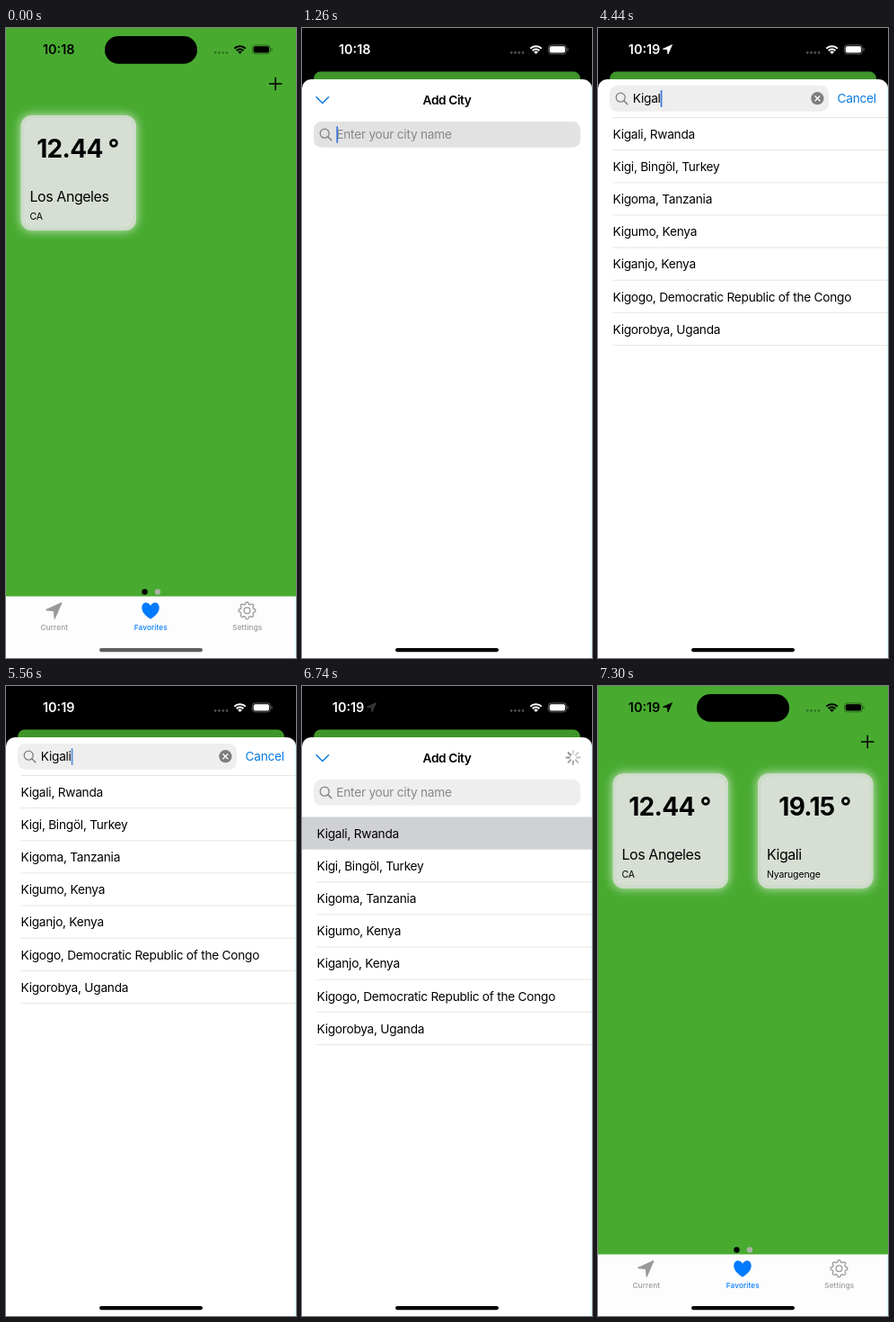
Write an HTML page with a canvas that moves like this. It is 323 by 700 pixels and loops after 8 s.

```html
<!DOCTYPE html>
<html lang="en">
<head>
<meta charset="utf-8">
<title>Add City</title>
<style>
html, body { margin: 0; width: 100%; height: 100%; overflow: hidden; background: #000; }
canvas { display: block; width: 323px; height: 700px; }
</style>
</head>
<body>
<canvas id="stage"></canvas>
<script>
const W = 323, H = 700, LOOP = 8000;
const canvas = document.getElementById('stage');
const dpr = window.devicePixelRatio || 1;
canvas.width = W * dpr;
canvas.height = H * dpr;
const ctx = canvas.getContext('2d');

const GREEN = '#48ab30', BLUE = '#0a7be0', GRAY = '#99999b';
const CITIES = ['Kigali, Rwanda', 'Kigi, Bingöl, Turkey', 'Kigoma, Tanzania', 'Kigumo, Kenya',
  'Kiganjo, Kenya', 'Kigogo, Democratic Republic of the Congo', 'Kigorobya, Uganda'];
const QUERY = 'Kigali', KEY_TIMES = [2610, 2860, 3440, 3930, 4440, 4800];
const SHEET_TOP = 57, ROW = 36.14;
const OPEN = 60, TAP = 1260, FOCUS = 1410, PICK = 6280, BLUR = 6360, CLOSE = 6785;

const ramp = (t, a, b) => Math.min(1, Math.max(0, (t - a) / (b - a)));
const easeOut = x => 1 - (1 - x) ** 3;
const easeInOut = x => x * x * (3 - 2 * x);

// Critically damped spring, 0 to 1
function spring(ms) {
  const x = Math.max(0, ms) * 0.0196;
  return 1 - (1 + x) * Math.exp(-x);
}

function text(str, x, y, size, { weight = 400, color = '#000', spacing = 0, align = 'left' } = {}) {
  ctx.font = `${weight} ${size}px Inter, sans-serif`;
  ctx.letterSpacing = spacing + 'px';
  ctx.textAlign = align;
  ctx.fillStyle = color;
  ctx.fillText(str, x, y);
  return ctx.measureText(str).width;
}
const body = (str, x, y, color) => text(str, x, y, 13.7, { color, spacing: -0.26 });

function box(x, y, w, h, r, color) {
  ctx.fillStyle = color;
  ctx.beginPath();
  ctx.roundRect(x, y, w, h, r);
  ctx.fill();
}

function dot(x, y, r, color) {
  ctx.fillStyle = color;
  ctx.beginPath();
  ctx.arc(x, y, r, 0, 7);
  ctx.fill();
}

function line(points, color, width, cap = 'butt') {
  ctx.strokeStyle = color;
  ctx.lineWidth = width;
  ctx.lineCap = cap;
  ctx.lineJoin = 'round';
  ctx.beginPath();
  points.forEach(([x, y]) => ctx.lineTo(x, y));
  ctx.stroke();
}

function layer(alpha, draw) {
  if (alpha <= 0) return;
  ctx.save();
  ctx.globalAlpha *= alpha;
  draw();
  ctx.restore();
}

function arrow(x, y, r, color) {
  ctx.fillStyle = ctx.strokeStyle = color;
  ctx.lineWidth = r * 0.15;
  ctx.lineJoin = 'round';
  ctx.beginPath();
  [[0.9, -0.9], [-0.9, -0.08], [0.02, 0.02], [0.1, 0.92]].forEach(([u, v]) => ctx.lineTo(x + u * r, y + v * r));
  ctx.closePath();
  ctx.fill();
  ctx.stroke();
}

function heart(x, y) {
  ctx.fillStyle = '#007aff';
  ctx.beginPath();
  ctx.moveTo(x, y + 9.5);
  for (const s of [-1, 1]) {
    ctx.moveTo(x, y + 9.5);
    ctx.bezierCurveTo(x + 5 * s, y + 6.5, x + 9.7 * s, y + 2.5, x + 9.7 * s, y - 3.2);
    ctx.bezierCurveTo(x + 9.7 * s, y - 10, x + 2.2 * s, y - 10.5, x, y - 5.3);
  }
  ctx.fill();
}

function gear(x, y) {
  ctx.strokeStyle = GRAY;
  ctx.lineWidth = 1.3;
  ctx.beginPath();
  for (let i = 0; i <= 160; i++) {
    const a = i / 160 * 2 * Math.PI;
    const r = 8.3 + Math.max(-1, Math.min(1, 2 * Math.cos(8 * a)));
    ctx.lineTo(x + r * Math.cos(a), y + r * Math.sin(a));
  }
  ctx.moveTo(x + 3.4, y);
  ctx.arc(x, y, 3.4, 0, 7);
  ctx.stroke();
}

function card(x, temp, city, region) {
  ctx.save();
  ctx.shadowColor = 'rgba(255,255,255,.75)';
  ctx.shadowBlur = 11 * dpr;
  box(x, 97, 128.5, 128, 12, '#cbdbc7');
  ctx.shadowColor = '#d7dfd5';
  ctx.shadowBlur = 4 * dpr;
  box(x + 4, 101, 120.5, 120, 9, '#d7dfd5');
  ctx.restore();
  text(temp, x + 63.5, 143.5, 28, { weight: 700, spacing: -0.7, align: 'center' });
  text(city, x + 10, 193, 16, { spacing: -0.45 });
  text(region, x + 10, 212.7, 10.5, { spacing: -0.15 });
}

function edgeTint(y) {
  ctx.fillStyle = '#e2fdff';
  ctx.fillRect(W - 1.5, y, 1.5, H);
}

function favorites(t) {
  ctx.fillStyle = GREEN;
  ctx.fillRect(0, 0, W, H);
  line([[293, 62], [307.4, 62]], '#000', 1.6);
  line([[300.2, 54.8], [300.2, 69.2]], '#000', 1.6);
  card(16.5, '12.44 °', 'Los Angeles', 'CA');
  if (t > CLOSE) card(178, '19.15 °', 'Kigali', 'Nyarugenge');
  dot(154.5, 626.5, 3.2, '#000');
  dot(169, 626.5, 3.2, '#a9b3a6');
  ctx.fillStyle = '#fdfdfd';
  ctx.fillRect(0, 631.5, W, 70);
  edgeTint(632);
  arrow(53.3, 647.3, 9.4, GRAY);
  heart(161, 647.3);
  gear(268.5, 647.3);
  const label = (str, x, color) => text(str, x, 668.7, 8.2, { weight: 500, color, spacing: 0.13, align: 'center' });
  label('Current', 53.8, GRAY);
  label('Favorites', 161.3, '#007aff');
  label('Settings', 268.8, GRAY);
}

function spinner(t, x, y) {
  const head = Math.floor(t / 125) % 8;
  for (let i = 0; i < 8; i++) {
    const a = i * Math.PI / 4, age = (head - i + 8) % 8;
    const at = r => [x + r * Math.cos(a), y + r * Math.sin(a)];
    line([at(4), at(7.6)], `rgba(60,60,67,${0.6 - 0.055 * age})`, 2, 'round');
  }
}

function searchField(t, y, active, query) {
  const right = 310 - 53 * active;
  box(13, y, right - 13, 28.8, 8.5, t >= TAP && t < FOCUS + 30 ? '#e2e2e3' : '#eeeeef');
  ctx.strokeStyle = '#7f7f83';
  ctx.lineWidth = 1.3;
  ctx.beginPath();
  ctx.arc(25.2, y + 13.2, 5, 0, 7);
  ctx.stroke();
  line([[28.8, y + 16.8], [32.8, y + 20.8]], '#7f7f83', 1.5, 'round');

  let end = 38.3;
  if (query) {
    end = 38.8 + body(query, 38.8, y + 19.4);
    const cx = right - 12.6, cy = y + 14.2;
    dot(cx, cy, 7.1, '#7d7d80');
    for (const s of [-1, 1]) line([[cx - 2.5, cy - 2.5 * s], [cx + 2.5, cy + 2.5 * s]], '#fff', 1.3, 'round');
  } else {
    body('Enter your city name', 38.3, y + 19.4, '#88888b');
  }
  if (t >= TAP && t < BLUR) {
    const blink = 1 - ramp(t, 1960, 2050) + ramp(t, 2310, 2400) - ramp(t, 5530, 5690) + ramp(t, 5940, 6040);
    layer(blink, () => box(end, y + 5, 1.8, 19, 0.9, '#3f78d8'));
  }
}

function sheet(t, offset) {
  const top = SHEET_TOP + offset;
  const bottomRadius = Math.min(50, offset * 50 / 28);
  const active = easeOut(ramp(t, FOCUS, 1690)) - easeOut(ramp(t, BLUR, 6660));
  const query = t < BLUR ? QUERY.slice(0, KEY_TIMES.filter(k => t >= k).length) : '';

  ctx.save();
  ctx.beginPath();
  ctx.roundRect(0, top, W, H - SHEET_TOP, [10, 10, bottomRadius, bottomRadius]);
  ctx.clip();
  ctx.fillStyle = '#fff';
  ctx.fillRect(0, top, W, H);
  edgeTint(top);

  layer(1 - active, () => {
    const y = top - 40 * active;
    line([[16, y + 19.7], [22.8, y + 26.5], [29.6, y + 19.7]], BLUE, 1.5, 'round');
    text('Add City', W / 2, y + 27.6, 13.7, { weight: 600, spacing: -0.4, align: 'center' });
    if (t >= BLUR) spinner(t, 302, y + 22.5);
  });
  layer(active, () => body('Cancel', 266.5 + 56 * (1 - active), top + 25.8, BLUE));
  searchField(t, top + 47 - 40 * active, active, query);

  const count = t < 3930 ? 0 : t < 4440 ? 2 : CITIES.length;
  const listTop = top + 88.5 - 46 * active;
  if (count && t >= PICK) {
    ctx.fillStyle = '#d0d1d5';
    ctx.fillRect(0, listTop, W, ROW);
  }
  if (count && active > 0.5) line([[16.5, listTop], [W, listTop]], '#e2e2e4', 0.9);
  CITIES.slice(0, count).forEach((city, i) => {
    const y = listTop + i * ROW;
    body(city, 16.5, y + 23.3);
    line([[16.5, y + ROW], [W, y + ROW]], '#e2e2e4', 0.9);
  });
  ctx.restore();
}

function statusBar(t, p) {
  const c = Math.round(255 * p ** 4), color = `rgb(${c},${c},${c})`;
  box(110, 9, 103, 30.7, 15.3, '#000');

  const slide = easeInOut(ramp(t, 2690, 2900)) - easeInOut(ramp(t, 4780, 5040)) + easeInOut(ramp(t, 6470, 6690));
  const marker = ramp(t, 2900, 3180) - ramp(t, 4500, 4780) + ramp(t, 6690, 6970);
  text(t < 3440 ? '10:18' : '10:19', 41 - 7.2 * slide, 29, 14.4, { weight: 600, color });
  layer(marker, () => arrow(77.4, 23.8, 5.6, color));

  layer(0.32, () => {
    for (let i = 0; i < 4; i++) dot(233.2 + 4.3 * i, 27.4, 1.35, color);
  });

  const arc = (r, width) => {
    ctx.strokeStyle = color;
    ctx.lineWidth = width;
    ctx.lineCap = 'butt';
    ctx.beginPath();
    ctx.arc(260.6, 29, r, -2.36, -0.78);
    ctx.stroke();
  };
  arc(8.8, 2);
  arc(5.4, 2);
  arc(1.7, 3.4);

  layer(0.4, () => {
    ctx.strokeStyle = color;
    ctx.lineWidth = 0.9;
    ctx.beginPath();
    ctx.roundRect(274.4, 18.9, 20, 10, 3.2);
    ctx.stroke();
    box(295.4, 22.2, 1.2, 3.4, 0.6, color);
  });
  box(275.7, 20.2, 17.4, 7.4, 2, color);
}

function draw(t) {
  const p = t < CLOSE ? spring(t - OPEN) : 1 - spring(t - CLOSE);
  ctx.setTransform(dpr, 0, 0, dpr, 0, 0);
  ctx.fillStyle = '#000';
  ctx.fillRect(0, 0, W, H);

  const scale = 1 - 0.08 * p;
  ctx.save();
  ctx.translate(W / 2 * (1 - scale), 48.3 * p);
  ctx.scale(scale, scale);
  ctx.beginPath();
  ctx.roundRect(0, 0, W, H, 9 * p);
  ctx.clip();
  favorites(t);
  ctx.fillStyle = `rgba(0,0,0,${0.13 * p})`;
  ctx.fillRect(0, 0, W, H);
  ctx.restore();

  if (p > 0.001) sheet(t, (H - SHEET_TOP) * (1 - p));
  statusBar(t, p);
  box(104, 689, 115, 4.2, 2.1, t < TAP ? '#5e5e5e' : '#000');
}

function frame(now) {
  draw(now % LOOP);
  requestAnimationFrame(frame);
}
requestAnimationFrame(frame);
</script>
</body>
</html>
```
